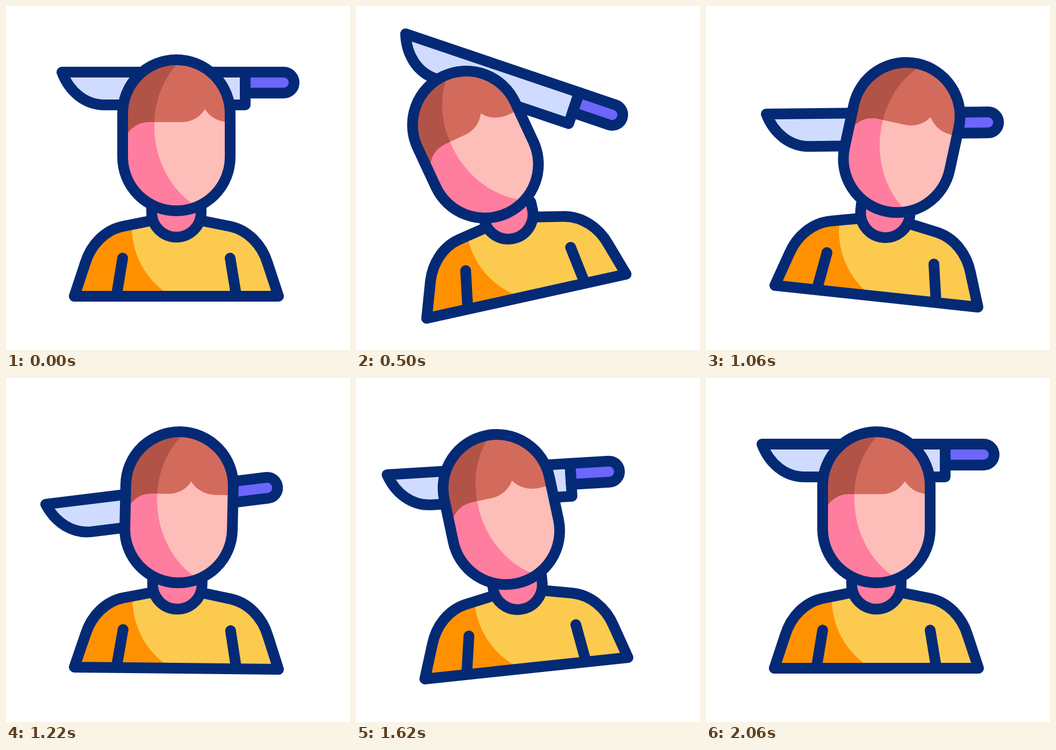
An HTML page for the animation above (2400 ms loop, 640x640 px).

```html
<!DOCTYPE html>
<html lang="en">
<head>
<meta charset="utf-8">
<title>Headache</title>
<style>
  html, body { margin: 0; width: 100%; height: 100%; overflow: hidden; background: #fff; }
  svg { display: block; width: 100%; height: 100%; }
  .line { fill: none; stroke: #042a76; stroke-width: 20; stroke-linecap: round; stroke-linejoin: round; }
</style>
</head>
<body>
<svg viewBox="0 0 640 640">
  <defs>
    <path id="hair"/>
    <rect id="skull" x="217" y="100" width="200" height="281" rx="100"/>
    <path id="shirt" d="M127 540 L147.5 478 C158 444 184 417 217 410 L267 400 H367 L417 410 C450 417 476 444 486.5 478 L507 540 Z"/>
    <path id="neck" d="M271 370 V384 A46 46 0 0 0 363 384 V370"/>
    <path id="blade" d="M104 123 C118 160 148 184 183 184 H445 V123 Z"/>
    <path id="handle" d="M445 123 H516.5 a19.5 19.5 0 0 1 0 39 H445 Z"/>
    <clipPath id="inSkull"><use href="#skull"/></clipPath>
    <clipPath id="inShirt"><use href="#shirt"/></clipPath>
    <clipPath id="inShade">
      <path d="M200 90 H335 L317 110 C290 140 276 180 276 225 C276 285 305 338 346 367 L366 381 V400 H200 Z"/>
    </clipPath>
  </defs>

  <g id="knife">
    <use href="#blade" fill="#cfdcff"/>
    <use href="#handle" fill="#6c66fd"/>
    <use href="#blade" class="line"/>
    <use href="#handle" class="line"/>
  </g>

  <g id="body">
    <use href="#shirt" fill="#fdca50"/>
    <path clip-path="url(#inShirt)" fill="#ff9100" d="M100 380 H233 L234 415 C236 465 260 505 293 530 L306 540 H100 Z"/>
    <path class="line" d="M217 469 L207 530 M417 469 L427 530"/>
    <use href="#shirt" fill="none"/>
    <path class="line" d="M267 400 L217 410 C184 417 158 444 147.5 478 L127 540 H507 L486.5 478 C476 444 450 417 417 410 L367 400"/>
    <use href="#neck" fill="#ff7d9f"/>
    <use href="#neck" class="line"/>

    <g id="head">
      <g clip-path="url(#inSkull)">
        <use href="#skull" fill="#fdbdb8"/>
        <use href="#hair" fill="#d36b5c"/>
        <g clip-path="url(#inShade)">
          <use href="#skull" fill="#ff7d9f"/>
          <use href="#hair" fill="#b25347"/>
        </g>
      </g>
      <use href="#skull" class="line"/>
    </g>
  </g>
</svg>
<script>
  const LOOP = 2400, STEP = 20;
  const part = id => document.getElementById(id);
  const [knife, body, head, hair] = ['knife', 'body', 'head', 'hair'].map(part);

  // Smooth curve through [time, value] keys that rests at every turning point.
  function track(...keys) {
    const slopes = keys.slice(1).map(([t, v], i) => (v - keys[i][1]) / (t - keys[i][0]));
    const tangents = keys.map((_, i) => {
      const a = slopes[i - 1], b = slopes[i];
      return a * b > 0 ? 2 * a * b / (a + b) : 0;
    });
    return time => {
      const i = keys.findIndex(([t]) => t > time) - 1;
      if (i < 0) return keys[keys.length - 1][1];
      const [t0, v0] = keys[i], [t1, v1] = keys[i + 1];
      const span = t1 - t0, p = (time - t0) / span, q = 1 - p;
      return v0 * q * q * (1 + 2 * p) + v1 * p * p * (3 - 2 * p)
        + span * p * q * (tangents[i] * q - tangents[i + 1] * p);
    };
  }

  const tilt = track([0, 0], [240, -5.25], [540, -12.75], [740, -4.26], [978, 6.95],
    [1060, 6.1], [1380, -5.35], [1510, -7.5], [1620, -6.03], [1980, 0]);
  const knifeX = track([0, 0], [240, -29], [378, -41], [740, 33], [845, 47],
    [1060, 8.2], [1380, -57.8], [1420, -59], [1620, -46], [2060, 0]);
  const knifeY = track([0, 0], [240, -7], [400, -11], [740, 27.5], [1060, 76],
    [1200, 87], [1380, 79], [1620, 44.3], [2060, 0]);
  const knifeTurn = track([0, 0], [240, 9], [540, 20.5], [590, 23.6], [740, 16.7],
    [1060, -0.55], [1340, -9.2], [1380, -8.9], [1620, -3.5], [1980, 0]);
  const hairShift = track([0, 0], [240, -21], [320, -24], [740, -7.5], [880, 0],
    [1060, -8.5], [1340, -43], [1380, -42], [1620, -22.5], [1980, 0]);

  function hairPath(shift) {
    const x = n => n + shift;
    return `M200 90 V260 L227 236 C237 223 250 216 267 216 H${x(327)}`
      + `C${x(345)} 216 ${x(361)} 207 ${x(370)} 192`
      + `C${x(379)} 206 ${x(394)} 215 ${x(413)} 216 H480 V90 Z`;
  }

  function draw(time) {
    const angle = tilt(time);
    body.setAttribute('transform', `rotate(${angle} 317 540)`);
    head.setAttribute('transform', `rotate(${angle} 317 386)`);
    knife.setAttribute('transform',
      `translate(${knifeX(time)} ${knifeY(time)}) rotate(${knifeTurn(time)} 310.25 133)`);
    hair.setAttribute('d', hairPath(hairShift(time)));
  }

  const start = performance.now();
  function tick() {
    const time = (performance.now() - start) % LOOP;
    draw(Math.floor(time / STEP) * STEP);
    requestAnimationFrame(tick);
  }
  tick();
</script>
</body>
</html>
```
